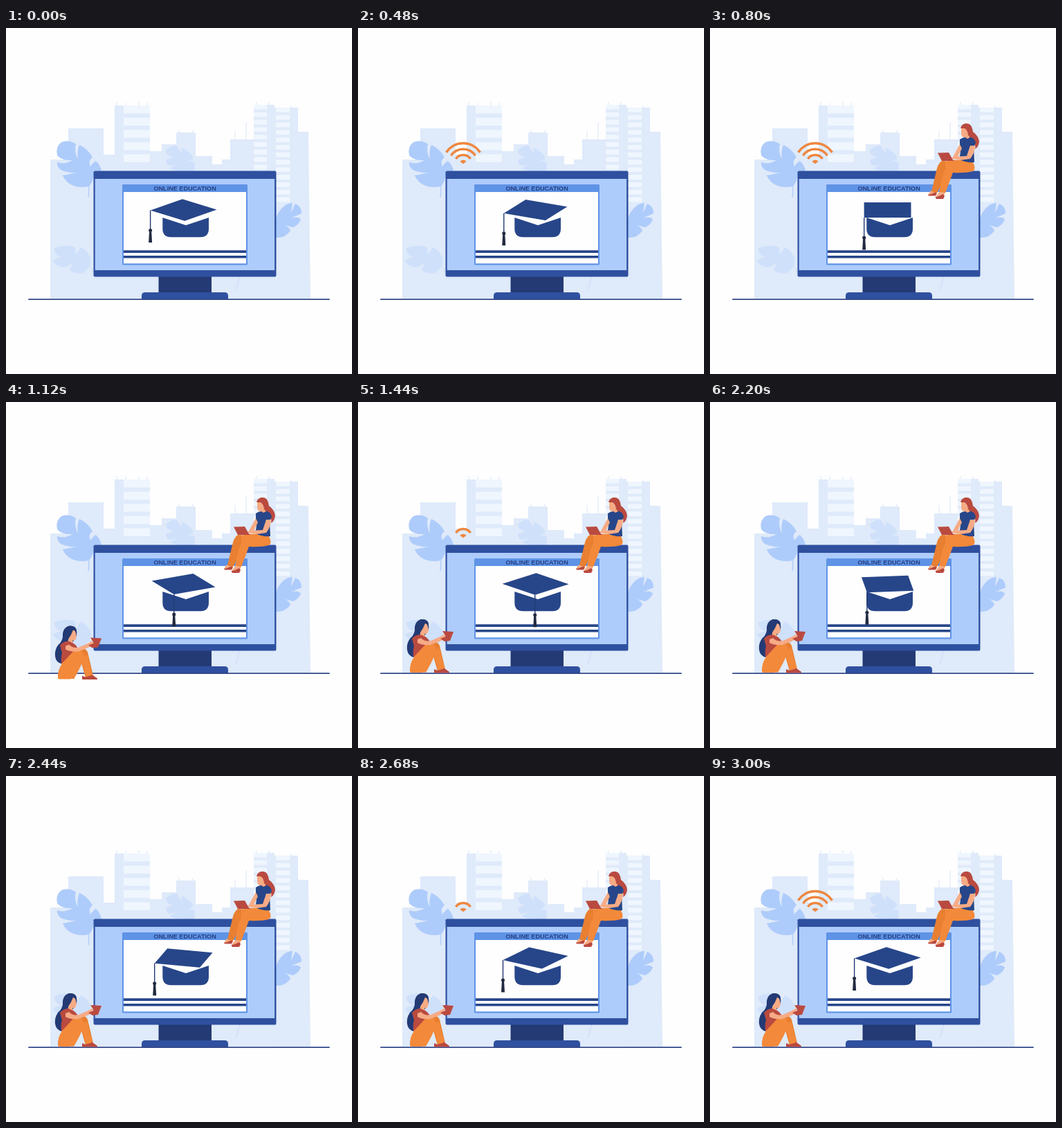
Write an HTML page that moves like this. It is 500 by 500 pixels and loops after 3080 ms.

```html
<!DOCTYPE html>
<html lang="en">
<head>
<meta charset="utf-8">
<title>Online education</title>
<style>
  html, body { margin: 0; width: 100%; height: 100%; overflow: hidden; background: #fefefe; }
  svg { display: block; width: 100vw; height: 100vh; }
  .city { fill: #dfeafa; }
  .pane { fill: #eff6fe; }
  .mast { stroke: #dfeafa; stroke-width: 1.2; }
  .leaf { fill: #aeccfb; }
  .pale { fill: #cfe0fb; }
  .stem { fill: none; stroke-width: 1.3; stroke-linecap: round; }
  .blue { fill: #2f509f; }
  .navy { fill: #274689; }
  .deep { fill: #233a74; }
  .skin { fill: #f6ab85; }
  .red { fill: #b94a40; }
  .pants { fill: #f3893a; }
  .shade { fill: #e87f31; }
  .title { font: bold 9.1px "Liberation Sans", Arial, sans-serif; fill: #243f80; text-anchor: middle; }
</style>
</head>
<body>
<svg viewBox="0 0 500 500">
  <g id="skyline">
    <path class="city" d="M64 391V190H90V145H141V183H157V112H208V178H225V168H246V151H274V185H298V197H312V190H324V161H358V111H388V115H422V150H437L440 391Z"/>
  </g>

  <g class="leaf">
    <path d="M120 229C104 232 88 228 82 213L103 209Q90 210 79 205Q73 199 74 194Q84 198 96 191Q80 192 74 184Q71 172 80 165Q92 161 101 168Q98 178 104 190Q102 178 106 169Q118 174 125 187Q118 192 122 200Q126 194 130 192Q137 199 138 207L127 206Q128 220 120 229Z"/>
    <path class="stem" stroke="#aeccfb" d="M118 220Q121 233 119 244"/>
    <path d="M388 302Q388 276 393 268Q402 253 414 253L412 267L418 254Q427 257 427 268Q418 272 412 274Q424 272 426 277Q422 286 414 288L404 285Q410 289 411 293Q404 303 392 303Z"/>
  </g>
  <g class="pale">
    <path d="M123 336Q120 322 108 317L101 328Q102 320 98 316Q84 312 70 318Q69 328 80 331Q72 333 68 336Q72 345 84 346L98 340Q92 346 92 350Q100 356 112 354Q121 347 123 336Z"/>
    <path class="stem" stroke="#cfe0fb" d="M108 337Q122 342 127 354M338 357L333 377"/>
    <path d="M231 178Q236 170 247 170Q250 178 255 180Q253 174 254 173Q266 178 271 188Q264 192 262 194Q268 192 273 194L272 207Q250 209 236 203L248 196Q238 200 233 198L231 190Q238 189 241 186Q233 186 231 178Z"/>
  </g>

  <g id="monitor">
    <rect class="deep" x="220.5" y="358" width="76.5" height="25"/>
    <path class="blue" d="M196 392V387Q196 382 201 382H316Q321 382 321 387V392Z"/>
    <rect class="blue" x="126.5" y="206.5" width="264" height="153" rx="2"/>
    <rect x="128.7" y="218" width="259.4" height="132" fill="#aeccfb"/>
    <rect x="168" y="226" width="181" height="116.5" rx="1.5" fill="#5f93e6"/>
    <rect x="170" y="237" width="177" height="103.3" fill="#fefefe"/>
    <path class="navy" d="M170 321.3H347V325H170ZM170 329H347V332.6H170Z"/>
    <text class="title" x="258.6" y="234.6">ONLINE EDUCATION</text>
  </g>
  <path d="M33 392.2H467" stroke="#33488a" stroke-width="1.7" stroke-linecap="round"/>

  <g id="cap" class="navy">
    <path d="M226.3 274L260 285L293 274V290Q293 302.3 281 302.3H238.5Q226.3 302.3 226.3 290Z"/>
    <path id="board"/>
    <g id="tassel">
      <path d="M0 0V28" stroke="#233a74" stroke-width="1.4"/>
      <g fill="#222a40">
        <circle cy="29" r="2.5"/>
        <path d="M-1.6 31H1.6L2.5 46.5H-2.5Z"/>
      </g>
    </g>
  </g>

  <g id="wifi" fill="none" stroke="#ee873f" stroke-width="3.5"></g>

  <g id="sitter">
    <path class="skin" d="M319 235L327 238L325 242H316L315 241ZM332 236L339 238L338 245H327L326 244Z"/>
    <path class="red" d="M315 241Q321 240 326 237L328 239L326 242.5H316ZM325.5 244.5Q332 243 337 240L339 243L337 247H327Z"/>
    <path class="shade" d="M335 192Q329 196 327 207L320 236L328 238.5L346 203L362 194Z"/>
    <path class="pants" d="M340 193Q352 190 362 191L380 194Q385 204 380 207Q368 210 351 209L340 238.5L331.5 236.5Q334 215 340 204Z"/>
    <path class="red" d="M364 141Q369 136 375 139Q379 142 380 150Q388 156 389 164Q388 172 383 175Q385 168 378 164Q370 160 370 153Z"/>
    <path class="skin" d="M363 146Q364 142 369 143Q375 146 373 153L376 160L366 162L368 158Q363 158 363 152Z"/>
    <path class="red" d="M362 145Q363 139 370 138Q378 140 377 151L373 156Q373 148 368 145Z"/>
    <path class="navy" d="M361 161Q365 158 369 158L372 160L376 158Q382 158 384 166L381 172L382 194Q370 195 360 190Q363 178 361 173Z"/>
    <path class="skin" d="M376 170L383 170Q382 182 376 189L362 191L350 189L351 186L371 185ZM361 168L364 174L358 186L352 190L350 188Z"/>
    <path class="red" d="M329 180.5L345 180L351 190.5L354 192H335Z"/>
  </g>

  <g id="reader">
    <path class="deep" d="M82 330Q81 316 93 314Q104 315 102 328Q98 338 91 341Q82 350 81 369Q72 367 71 358Q70 349 75 342Q81 337 82 330Z"/>
    <path class="skin" d="M89 324Q92 318 99 320Q103 327 101 333Q99 336 96 335L98 342L88 342L90 334Z"/>
    <path class="deep" d="M83 330Q81 317 91 314Q102 313 102 322L97 320Q94 328 90 333Q88 340 82 343Z"/>
    <path class="red" d="M78 342Q83 336 90 336L97 339Q104 343 104 350L96 357L80 369Q79 358 81 353Z"/>
    <path class="shade" d="M93 389Q98 362 106 349Q114 344 118 352L126 386L115 389L109 368L98 391Z"/>
    <path class="pants" d="M75 390Q74 378 82 367L97 351Q108 345 112 354Q114 362 103 382Q99 391 92 391H77Z"/>
    <path class="pants" d="M108 360L117 355L125 385L116 388Z"/>
    <path class="red" d="M110 391V386L115 388L119 391ZM115 388L125 385L132 390V391.5H110Z"/>
    <path class="skin" d="M86 343L91 341Q97 347 105 345L119 339L124 336L127 339L122 344L105 351Q94 352 86 348Z"/>
    <path class="red" d="M122 331L138 332L133 345L125 346L119 342L127 339Z"/>
  </g>
</svg>
<script>
const NS = 'http://www.w3.org/2000/svg';
const LOOP = 3080, STEP = 40;
const byId = id => document.getElementById(id);
const clamp = v => Math.max(0, Math.min(1, v));
const ease = v => (1 - Math.cos(Math.PI * clamp(v))) / 2;
const span = (t, from, to) => clamp((t - from) / (to - from));

function add(parent, tag, attrs) {
  const el = document.createElementNS(NS, tag);
  for (const key in attrs) el.setAttribute(key, attrs[key]);
  return parent.appendChild(el);
}

function addWindows(x, y, width, height, pitch, count) {
  for (let i = 0; i < count; i++)
    add(byId('skyline'), 'rect', { class: 'pane', x, y: y + i * pitch, width, height });
}
addWindows(170, 112, 38, 11.5, 17.6, 5);
addWindows(358, 111, 19, 6.8, 10.8, 9);
addWindows(390, 115, 20, 6.8, 10.8, 13);

const masts = [[160, 107, 112], [173, 108, 112], [192, 107, 112], [204, 108, 112], [250, 147, 151],
  [270, 147, 151], [331, 149, 161], [347, 136, 161], [362, 107, 111], [380, 107, 111], [412, 112, 115]];
for (const [x, y1, y2] of masts)
  add(byId('skyline'), 'line', { class: 'mast', x1: x, x2: x, y1, y2 });

// Wi-Fi: a wedge and three concentric arcs
const HUB = { x: 152, y: 196.2 }, HALF = 56 * Math.PI / 180;
function arc(r) {
  const dx = r * Math.sin(HALF), y = HUB.y - r * Math.cos(HALF);
  return `M${HUB.x - dx} ${y}A${r} ${r} 0 0 1 ${HUB.x + dx} ${y}`;
}
const bars = [5.5, 12.8, 21.2, 29.6].map((r, i) => add(byId('wifi'), 'path',
  i ? { d: arc(r) } : { d: `${arc(r)}L${HUB.x} ${HUB.y}Z`, fill: '#ee873f', stroke: 'none' }));
const BAR_ON = [120, 200, 320, 440], BAR_OFF = 920, WIFI_PERIOD = 1240;

function drawWifi(t) {
  const phase = t % WIFI_PERIOD;
  bars.forEach((bar, i) =>
    bar.setAttribute('visibility', phase >= BAR_ON[i] && phase < BAR_OFF ? 'visible' : 'hidden'));
}

// The board is a square turning on a flattened circle; the tassel hangs from one corner.
function drawCap(t) {
  const turn = ease(span(t, 80, 1540)) - ease(span(t, 1540, 2980));
  const angle = 178 - 88 * turn;
  const corner = k => {
    const a = (angle + 90 * k) * Math.PI / 180;
    return [256.6 + 48 * Math.cos(a), 263 + 15.7 * Math.sin(a)];
  };
  byId('board').setAttribute('d', `M${[0, 1, 2, 3].map(corner).join('L')}Z`);
  byId('tassel').setAttribute('transform', `translate(${corner(0)})`);
}

function enter(id, t, from, to, offset) {
  const el = byId(id);
  el.setAttribute('transform', `translate(0 ${offset * (1 - ease(span(t, from, to)))})`);
  el.setAttribute('opacity', span(t, from, (from + to) / 2));
}

function draw(ms) {
  let t = Math.min(Math.floor(ms % LOOP / STEP) * STEP, 3000);
  if (t < 120) t = 0;
  drawCap(t);
  drawWifi(t);
  enter('sitter', t, 560, 800, -52);
  enter('reader', t, 960, 1200, 38);
}

let start;
function tick(now) {
  start ??= now;
  draw(now - start);
  requestAnimationFrame(tick);
}
draw(0);
requestAnimationFrame(tick);
</script>
</body>
</html>
```
